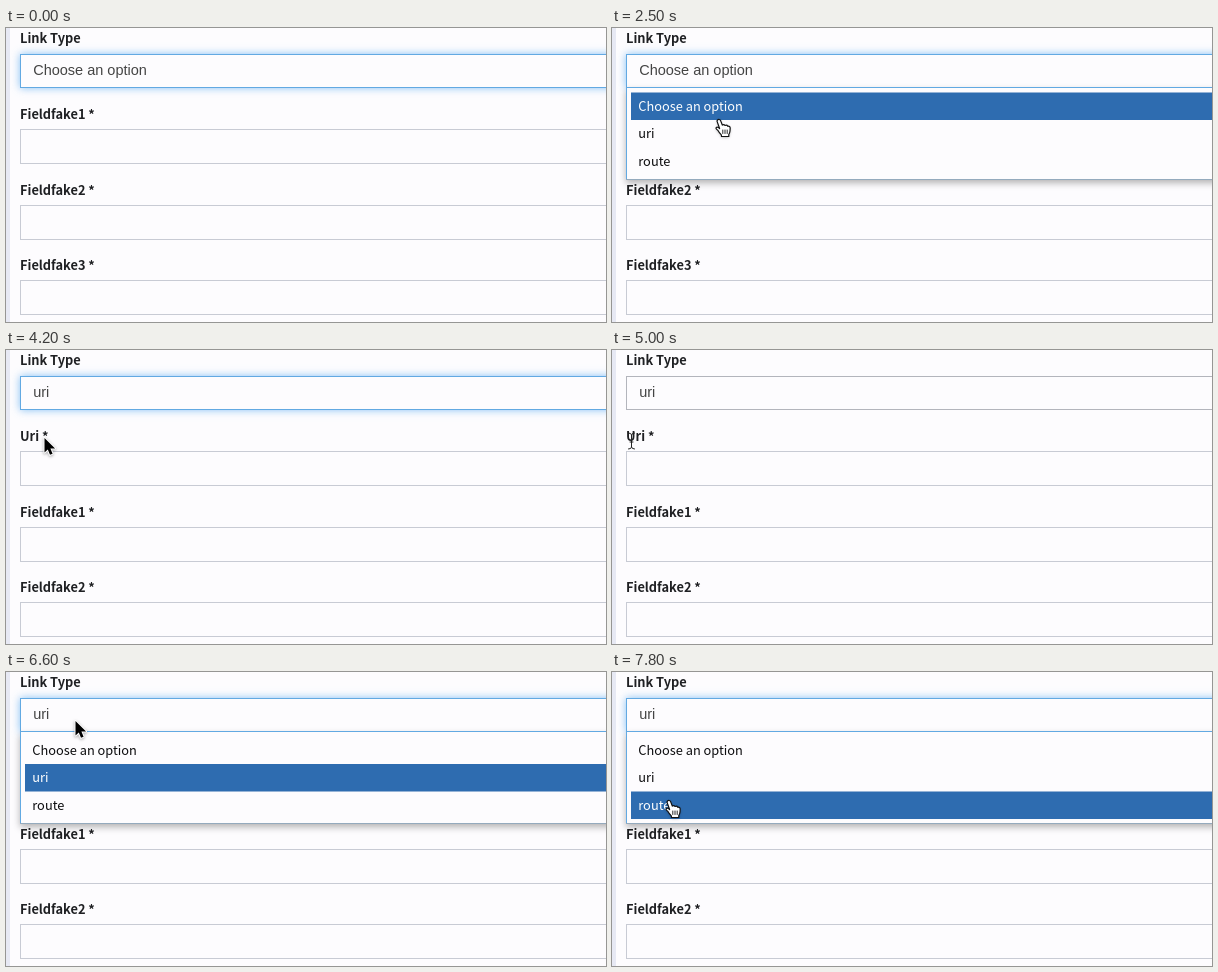
These frames come from a looping animation (600 px wide and 294 px high, 8 s). An HTML page with a canvas:

```html
<!DOCTYPE html>
<html lang="en">
<head>
<meta charset="utf-8">
<title>Link type form</title>
<style>
  html, body { margin: 0; width: 100%; height: 100%; overflow: hidden; background: #fdfcfe; }
  canvas { display: block; }
</style>
</head>
<body>
<canvas id="stage" width="600" height="294"></canvas>
<script>
const ctx = document.getElementById('stage').getContext('2d');
const LOOP = 8000, STEP = 100;
const PAPER = '#fdfcfe', BLUE = '#62a9e2', INK = '#1f2023';
const SANS = '"Noto Sans CJK JP", "Noto Sans CJK SC", "Noto Sans CJK", "Open Sans", sans-serif';
const LABEL = `bold 12.8px ${SANS}`, OPTION = `12.8px ${SANS}`;
const VALUE = '14.5px "Liberation Sans", Arial, sans-serif';
const OPTIONS = ['Choose an option', 'uri', 'route'];
const PITCH = 75.6, ROW = 27.5;

const ARROW = new Path2D('M0 0V14.6L3.3 11.6L5.5 16.8L8.1 15.7L5.9 10.6L10.6 10.4Z');
const HAND = new Path2D('M-2 1.6Q-1.6-.4 .3 0Q1.5 .3 2 2L3.3 5.6Q5 4.6 6 6Q8 5.2 8.8 6.8Q11 6.3 11.2 8.5' +
  'L11 11.5Q10.8 13.5 9.8 15V17H2.5L2.3 15.3Q0 13-1.2 10.8Q-3.6 9-2.8 8Q-1.5 7 .6 9Z');
const KNUCKLES = new Path2D('M3.8 10.5V14M6 10.5V14M8.2 10.5V14');
const BEAM = new Path2D('M-3 0Q0 0 0 2V14Q0 16-3 16M3 0Q0 0 0 2M0 14Q0 16 3 16M-1.5 9H1.5');

// time, x, y, shape shown until the next stop
const MOVES = [
  [700, 164, 141, 'arrow'], [800, 161, 113, 'beam'], [900, 154, 86, 'arrow'],
  [1000, 143, 63, 'arrow'], [1100, 137, 52.5, 'hand'], [1500, 130, 50, 'hand'],
  [2300, 128, 55, 'hand'], [2400, 114, 78, 'hand'], [2500, 107, 91.5, 'hand'],
  [3100, 103, 103, 'hand'], [3500, 103, 103, 'beam'], [3900, 103, 101, 'beam'],
  [4000, 84, 97, 'arrow'], [4200, 38.5, 88, 'arrow'], [4700, 12, 84, 'beam'],
  [4900, 12, 84, 'beam'], [5100, 27, 82, 'beam'], [5400, 54, 81, 'arrow'],
  [5600, 54, 81, 'arrow'], [5700, 52, 79, 'arrow'], [6100, 69.5, 49, 'arrow'],
  [7000, 69.5, 49, 'arrow'], [7100, 68, 64, 'hand'], [7600, 57, 128.5, 'hand']
];

function text(str, x, y, font, color) {
  ctx.font = font;
  ctx.fillStyle = color;
  ctx.fillText(str, x, y);
}

function rect(x, y, w, h, color) {
  ctx.fillStyle = color;
  ctx.fillRect(x, y, w, h);
}

function shadowed(color, blur, dy, draw) {
  ctx.save();
  ctx.shadowColor = color;
  ctx.shadowBlur = blur;
  ctx.shadowOffsetY = dy;
  draw();
  ctx.restore();
}

function box(y, h, border) {
  ctx.strokeStyle = border;
  ctx.lineWidth = 1;
  ctx.strokeRect(14.5, y + .5, 640, h);
}

function drawSelect(value, focused) {
  if (focused) {
    shadowed('rgba(92,172,240,.75)', 8, 0, () => rect(14, 26, 640, 34, PAPER));
  }
  box(26, 33, focused ? BLUE : '#b3b5bc');
  text(value, 27.2, 47, VALUE, '#444');
}

function drawMenu(active) {
  shadowed('rgba(0,0,0,.3)', 7, 3, () => rect(14, 60, 640, 92, PAPER));
  rect(14, 59, 640, 93, PAPER);
  box(59, 92, BLUE);
  rect(14, 151, 600, 1, '#94aabd');
  OPTIONS.forEach((name, i) => {
    const y = 64.5 + i * ROW;
    if (i === active) rect(19, y, 600, ROW, '#2e6cb0');
    text(name, 26.3, y + 18, OPTION, i === active ? '#fff' : '#0c0c0e');
  });
}

function cursorAt(t) {
  const i = MOVES.findLastIndex(move => move[0] <= t);
  if (i < 0) return null;
  const [t0, x0, y0, shape] = MOVES[i];
  const [t1, x1, y1] = MOVES[i + 1] || [LOOP, x0, y0];
  // long gaps between stops are rests on either side of a move
  const resting = t0 === 1500 || t0 === 6100;
  const k = resting ? 0 : (t - t0) / (t1 - t0);
  return { x: x0 + (x1 - x0) * k, y: y0 + (y1 - y0) * k, shape };
}

function drawCursor({ x, y, shape }) {
  ctx.save();
  ctx.translate(x, y);
  ctx.lineJoin = ctx.lineCap = 'round';
  if (shape === 'arrow') {
    ctx.lineWidth = 2;
    ctx.strokeStyle = '#fff';
    shadowed('rgba(0,0,0,.35)', 3, 1, () => ctx.stroke(ARROW));
    ctx.fillStyle = '#000';
    ctx.fill(ARROW);
  } else if (shape === 'hand') {
    ctx.fillStyle = '#fff';
    shadowed('rgba(0,0,0,.3)', 3, 1, () => ctx.fill(HAND));
    ctx.strokeStyle = '#111';
    ctx.lineWidth = 1.2;
    ctx.stroke(HAND);
    ctx.lineWidth = .9;
    ctx.stroke(KNUCKLES);
  } else {
    ctx.strokeStyle = '#222';
    ctx.lineWidth = 1;
    ctx.stroke(BEAM);
  }
  ctx.restore();
}

function draw(t) {
  const chosen = t >= 3500;
  const open = (t >= 1700 && t < 3500) || t >= 6600;
  const focused = t < 4300 || open;
  const cursor = cursorAt(t);
  const labels = chosen ? ['Uri *', 'Fieldfake1 *', 'Fieldfake2 *']
                        : ['Fieldfake1 *', 'Fieldfake2 *', 'Fieldfake3 *'];

  rect(0, 0, 600, 294, PAPER);
  rect(0, 0, 4, 294, '#e7e9f4');
  text('Link Type', 14, 15.3, LABEL, INK);

  if (t >= 5100) {
    const end = Math.min(36.5, cursor.x);
    rect(14, 76, end - 14, 20, '#a7d1fa');
  }
  labels.forEach((label, i) => {
    text(label, 14, 15.3 + PITCH * (i + 1), LABEL, INK);
    box(Math.round(25.6 + PITCH * (i + 1)), 34, '#c8cbd4');
  });

  drawSelect(chosen ? 'uri' : OPTIONS[0], focused);
  if (open) {
    const first = chosen ? 1 : 0;
    const row = Math.floor((cursor.y - 64.5) / ROW);
    drawMenu(row < 0 ? first : Math.min(row, 2));
  }
  if (cursor) drawCursor(cursor);
}

function tick(now) {
  draw(Math.floor(now % LOOP / STEP) * STEP);
  requestAnimationFrame(tick);
}
requestAnimationFrame(tick);
</script>
</body>
</html>
```
